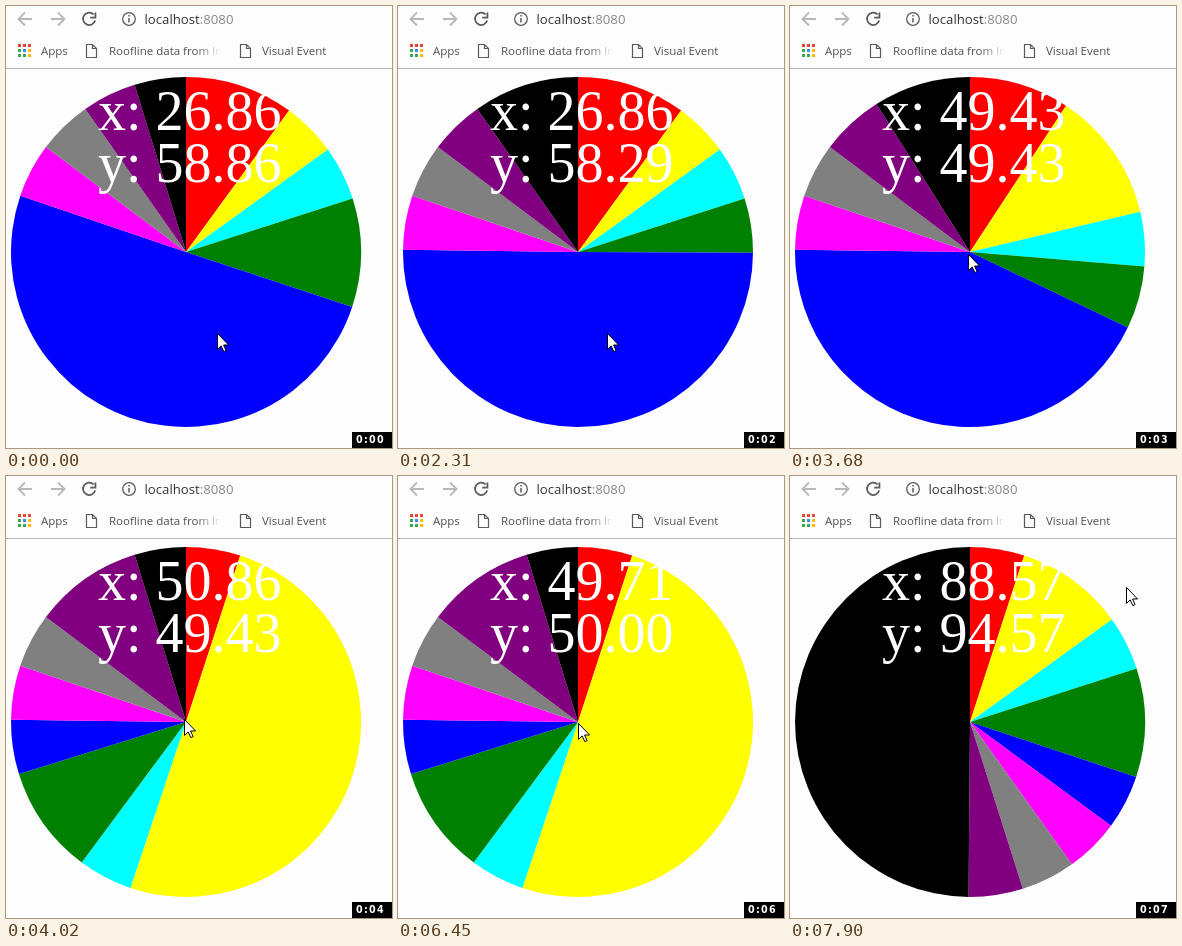
These frames come from a looping animation (386 by 442 pixels, 8 s). An HTML page:

```html
<!DOCTYPE html>
<html>
<head>
<meta charset="utf-8">
<style>
  html, body { margin: 0; width: 100%; height: 100%; overflow: hidden; background: #fdfdfd; }
  svg { display: block; }
  .ui { font: 11.5px "Open Sans", "Noto Sans", sans-serif; fill: #505050; }
  .address { font-size: 13.2px; fill: #333; }
  .icon { fill: none; stroke: #5a5a5a; }
  .icon .off { stroke: #b8b8b8; }
  .label { font: 56px "Liberation Serif", "Times New Roman", serif; fill: #fff; }
  .clock { font: bold 9.6px "DejaVu Sans", sans-serif; letter-spacing: 1.3px; fill: #fff; }
</style>
</head>
<body>
<svg width="386" height="442" viewBox="0 0 386 442">
  <defs>
    <linearGradient id="fade" gradientUnits="userSpaceOnUse" x1="190" x2="215">
      <stop stop-color="#505050"/><stop offset="1" stop-color="#505050" stop-opacity="0"/>
    </linearGradient>
    <path id="page" d="M.5 .5H6.5L10.5 4.5V13.5H.5ZM6.5 .5V4.5H10.5" class="icon" stroke-width="1.2"/>
  </defs>

  <g class="icon" stroke-width="1.8">
    <path class="off" d="M26 13H13M19 6.5L12.5 13L19 19.5M45 13H58M52 6.5L58.5 13L52 19.5"/>
    <path id="reload" d="M87.6 8.4A6.2 6.2 0 1 0 89.2 14.5M89.4 6.5V11.6H84.2"/>
    <path id="stop" d="M77.5 7.5L88.5 18.5M88.5 7.5L77.5 18.5"/>
    <circle cx="123" cy="13" r="6.3" stroke-width="1.3"/>
    <path d="M123 12V16.5M123 9V10.6" stroke-width="1.5"/>
  </g>
  <g class="ui">
    <text class="address" x="138.5" y="18">localhost<tspan fill="#888">:8080</tspan></text>
    <text x="35" y="49">Apps</text>
    <text x="103" y="49" fill="url(#fade)">Roofline data from In</text>
    <text x="256" y="49">Visual Event</text>
  </g>
  <g id="apps"></g>
  <use href="#page" x="80" y="38"/>
  <use href="#page" x="234" y="38"/>
  <path d="M0 62.5H386" stroke="#b6b6b6"/>

  <g id="pie"></g>
  <g id="labels" class="label">
    <text id="labelX" x="92" y="124"></text>
    <text id="labelY" x="92" y="176"></text>
  </g>
  <path id="cursor" d="M.5 .5V16.4L4.2 12.9L6.8 18.6L9.1 17.6L6.6 12H11.6Z" fill="#fff" stroke="#000"/>
  <path d="M346 426H386V442H346Z"/>
  <text id="clock" class="clock" x="350" y="437"></text>
</svg>
<script>
const $ = id => document.getElementById(id);
const LOOP = 8000, REFRESH = 114.8, CX = 180, CY = 246, R = 175;
const COLORS = ["red", "yellow", "cyan", "green", "blue", "magenta", "gray", "purple", "black"];
const UNIT = 2 * 3.15 / 20; // radians per share, with a rounded pi

// One slice takes ten shares, two take double, the rest one each.
function sliceEnds(big, doubled) {
  let sum = 0;
  return COLORS.map((color, i) => {
    sum += color === big ? 10 : doubled.includes(color) ? 2 : 1;
    return i === COLORS.length - 1 ? 2 * Math.PI : sum * UNIT;
  });
}
const BEFORE = sliceEnds("blue", ["red", "green"]);
const RELOADED = sliceEnds("blue", ["red", "black"]);
const YELLOW = sliceEnds("yellow", ["green", "purple"]);
const BLACK = sliceEnds("black", ["yellow", "green"]);

// Pointer path: time, x, y
const POINTER = [[700, 211, 327], [2290, 209, 327], [2580, 206, 326], [3400, 167, 260],
  [3670, 178, 248], [4010, 178, 243], [4850, 178, 243], [5400, 180, 250], [6400, 180, 247],
  [7240, 180, 243], [7510, 266, 160], [7800, 336, 111]];

const make = (parent, tag, attrs) => {
  const el = document.createElementNS("http://www.w3.org/2000/svg", tag);
  for (const key in attrs) el.setAttribute(key, attrs[key]);
  return parent.appendChild(el);
};
const show = (id, on) => $(id).setAttribute("visibility", on ? "visible" : "hidden");
const mix = (a, b, k) => a + (b - a) * k;
const progress = (t, from, to) => Math.min(1, Math.max(0, (t - from) / (to - from)));
const easeInOut = k => k < .5 ? 4 * k ** 3 : 1 - 4 * (1 - k) ** 3;

const [red, green, blue, amber] = ["#ea4335", "#34a853", "#4285f4", "#fbbc05"];
[red, red, red, green, blue, amber, green, green, amber].forEach((fill, i) =>
  make($("apps"), "rect", { x: 12 + i % 3 * 5, y: 38 + Math.floor(i / 3) * 5, width: 3, height: 3, fill }));
const slices = COLORS.map(fill => make($("pie"), "path", { fill }));

function pieAt(t) {
  const [from, to, start] = t < 6700 ? [RELOADED, YELLOW, 3504] : [YELLOW, BLACK, 6720];
  const k = easeInOut(progress(t, start, start + 500));
  return from.map((end, i) => mix(end, to[i], k));
}

function pointerAt(t) {
  const next = Math.max(1, POINTER.findIndex(p => p[0] > t));
  const i = t >= POINTER.at(-1)[0] ? POINTER.length - 1 : next;
  const [t0, x0, y0] = POINTER[i - 1], [t1, x1, y1] = POINTER[i];
  const k = progress(t, t0, t1);
  return [Math.round(mix(x0, x1, k)), Math.round(mix(y0, y1, k))];
}

const rim = a => `${CX + R * Math.sin(a)} ${CY - R * Math.cos(a)}`;

function drawPie(ends) {
  let start = 0;
  ends.forEach((end, i) => {
    const large = end - start > Math.PI ? 1 : 0;
    slices[i].setAttribute("d", `M${CX} ${CY}L${rim(start)}A${R} ${R} 0 ${large} 1 ${rim(end)}Z`);
    start = end;
  });
}

function draw(now) {
  const time = now % LOOP;
  const t = Math.floor(time / REFRESH) * REFRESH; // the screen is sampled in steps

  const loading = time >= 120 && time < 660;
  show("reload", !loading);
  show("stop", loading);
  show("pie", time < 420 || time >= 660);
  show("labels", time < 420 || time >= 1460);
  drawPie(time < 420 ? BEFORE : pieAt(t));

  const [x, y] = pointerAt(t);
  $("cursor").setAttribute("transform", `translate(${x} ${y})`);
  $("labelX").textContent = "x: " + ((CY + R - y) / 3.5).toFixed(2);
  $("labelY").textContent = "y: " + ((x - CX + R) / 3.5).toFixed(2);
  $("clock").textContent = "0:0" + Math.floor((time + 115) / 1015);
}

const began = performance.now();
function tick() {
  draw(performance.now() - began);
  requestAnimationFrame(tick);
}
tick();
</script>
</body>
</html>
```
